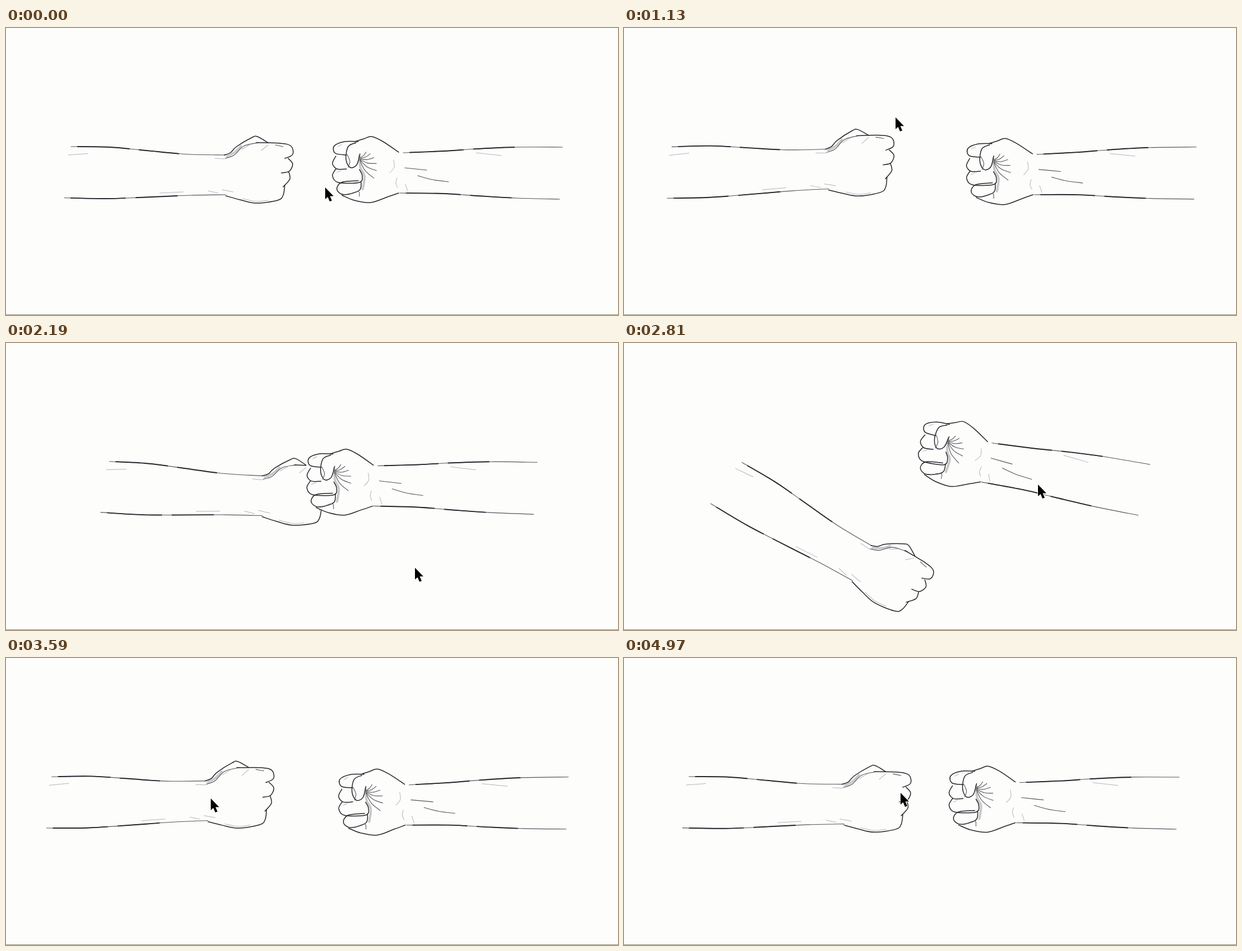
An HTML page that plays this animation: 1091 by 513 pixels, repeating every 5000 ms.

```html
<!DOCTYPE html>
<html lang="en">
<head>
<meta charset="utf-8">
<title>Fist bump</title>
<style>
html, body { margin: 0; width: 100%; height: 100%; overflow: hidden; background: #fdfdfc; }
svg { display: block; width: 100%; height: 100%; }
path { fill: none; stroke: #25252a; stroke-width: 1.5; stroke-linecap: round; stroke-linejoin: round; }
.skin { fill: #fdfdfc; stroke: none; }
.thin { stroke: #55555c; stroke-width: 1.1; }
.bold { stroke-width: 1.9; stroke-linecap: butt; stroke-dasharray: 0 4 34 6 26 30; }
.faint { stroke: #b4b4bb; stroke-width: 1; }
.shade { stroke: #77777d; stroke-width: 4; opacity: .4; }
#cursor path { fill: #000; stroke: #fff; stroke-width: 1.8; paint-order: stroke; }
</style>
</head>
<body>
<svg viewBox="0 0 1091 513" preserveAspectRatio="none">
  <g id="left"></g>
  <g id="right"></g>
  <g id="cursor"><path d="M0 0V21L4.6 17L8 25L12 23.5L8.5 15.5H15Z"/></g>
  <rect y="512" width="1091" height="1" fill="#8c8c74"/>
</svg>
<script>
const LOOP = 5000;
const [left, right, cursor] = ["left", "right", "cursor"].map(id => document.getElementById(id));

// Smooth stroke through a few points.
function curve(parent, style, points) {
  const p = points.split(" ").map(pair => pair.split(",").map(Number));
  const at = i => p[Math.max(0, Math.min(p.length - 1, i))];
  const handle = (i, sign) => at(i).map((v, k) => v + sign * (at(i + 1)[k] - at(i - 1)[k]) / 6);
  let d = "M" + p[0];
  for (let i = 1; i < p.length; i++) d += `C${handle(i - 1, 1)} ${handle(i, -1)} ${p[i]}`;
  const path = document.createElementNS("http://www.w3.org/2000/svg", "path");
  path.setAttribute("d", d);
  path.setAttribute("class", style);
  path.setAttribute("pathLength", 100);
  parent.append(path);
}

function forearm(parent, points) {
  curve(parent, "thin", points);
  curve(parent, "bold", points);
}

// Back of the left fist
forearm(left, "116,212 185,213 250,219 320,225.5 391,227");
forearm(left, "104,303.5 180,305 260,302 330,299 392,298");
curve(left, "shade", "394,229 408,222 419,211");
curve(left, "ink", "389,227 400,223 411,212 438,196 448,194 467,205");
curve(left, "thin", "391,233 407,227 424,211 450,205");
curve(left, "ink", "446,205 488,206 508,211 511,226 497,233");
curve(left, "ink", "503,233 511,243 505,256 491,259");
curve(left, "ink", "504,257 506,270 494,284");
curve(left, "ink", "497,281 494,299 484,308 446,313 417,307 392,300");
curve(left, "thin", "480,209 494,212");
for (const mark of ["111,227 146,224.5", "274,295 316,293", "360,291 378,295", "385,289 405,293",
  "372,233 390,234", "420,217 434,209", "455,219 467,209", "422,305 446,310 467,308"])
  curve(left, "faint", mark);

// Palm side of the right fist
curve(right, "skin", "622,203 652,194 694,220 706,223 706,296 682,301 645,312 596,298 583,264 581,240 585,211 622,203");
forearm(right, "708,223 780,220 840,216 910,213 992,213");
forearm(right, "702,295 780,296 840,300 910,304 987,306");
curve(right, "shade", "630,229 632,250 639,265 636,288");
curve(right, "ink", "622,203 638,198 652,194 672,203 700,222");
curve(right, "ink", "599,299 621,308 650,312 680,302 700,295");
curve(right, "ink", "628,203 604,203 585,211 587,224 607,227");
curve(right, "ink", "588,229 582,242 590,252 607,252");
curve(right, "ink", "588,252 582,264 592,276 630,276 635,264 630,253");
curve(right, "ink", "628,273 598,276 590,289 603,298 630,290 633,274");
curve(right, "ink", "624,205 610,212 606,234 613,249 625,245 631,225");
curve(right, "thin", "608,226 613,238 610,249");
curve(right, "thin", "610,298 628,292 630,301");
curve(right, "thin", "711,250 750,254");
curve(right, "thin", "734,264 760,271 789,275");
for (const mark of ["838,223 883,228", "691,236 692,249 684,259", "697,268 695,277 698,285",
  "712,279 716,291", "592,212 599,208", "590,258 597,255"])
  curve(right, "faint", mark);

// Creases fan out from under the thumb.
for (let k = 0; k < 6; k++) {
  const angle = -.75 + k * .33, reach = 15 + 5 * k;
  const point = (r, bend) => `${631 + r * Math.cos(angle + bend)},${232 + k + r * Math.sin(angle + bend)}`;
  curve(right, "thin", `${point(0, 0)} ${point(reach / 2, .2)} ${point(reach, 0)}`);
}

// Each key: time, x, then angle or y.
const leftKeys = [
  [0, 113, 0], [300, 135, 1], [550, 165, .6], [630, 162, .4], [1075, 82, -1.5],
  [1300, 105, -7], [1590, 158, -20.2], [1780, 168, -25], [2130, 178, -3], [2600, 188, 38],
  [2810, 185, 29.7], [3220, 137, 7], [3420, 96, -4], [3590, 80, -1.6], [3700, 79, -.6],
  [4000, 122, 0], [4340, 179, -1.4], [4740, 103, .5], [4970, 113, -.3]
];
const rightKeys = [
  [0, 989, 0], [300, 973, 0], [580, 954, 0], [630, 955.5, 0], [1075, 1019, -.4],
  [1590, 968, -6.7], [1780, 961, -8.3], [2130, 946, -1], [2600, 928, 12.8], [2810, 926.5, 9.8],
  [3220, 954, 2.3], [3590, 1000, -.8], [3710, 1014, -.2], [4340, 967.5, .4], [4740, 989, 0], [4970, 986.5, .1]
];
const cursorKeys = [
  [0, 569, 285], [300, 690, 262], [630, 419, 243], [850, 340, 245], [1300, 590, 90],
  [1590, 682, 7], [2400, 735, 480], [2810, 738, 253], [3590, 365, 251], [4000, 680, 260], [4340, 493, 241]
];

function slope(keys, i, column) {
  if (!i || i === keys.length - 1) return 0;
  const rate = j => (keys[j + 1][column] - keys[j][column]) / (keys[j + 1][0] - keys[j][0]);
  const a = rate(i - 1), b = rate(i);
  return a * b <= 0 ? 0 : 2 * a * b / (a + b);
}

// Monotone cubic interpolation; the last key is held.
function sample(keys, time) {
  const next = keys.findIndex(key => key[0] > time);
  if (next < 0) return keys[keys.length - 1].slice(1);
  const from = keys[next - 1], to = keys[next];
  const span = to[0] - from[0], u = (time - from[0]) / span, ease = u * u * (3 - 2 * u);
  return [1, 2].map(c => from[c] + (to[c] - from[c]) * ease
    + span * u * (1 - u) * ((1 - u) * slope(keys, next - 1, c) - u * slope(keys, next, c)));
}

function place(arm, x, y, angle, pivot) {
  arm.setAttribute("transform", `translate(${x} ${y}) rotate(${angle}) translate(${pivot})`);
}

function draw() {
  const time = performance.now() % LOOP;
  const [lx, la] = sample(leftKeys, time);
  const [rx, ra] = sample(rightKeys, time);
  place(left, lx, 258 - .2 * la, la, "-113 -258");
  place(right, rx, 259.5 + .3 * ra, ra, "-989 -259.5");
  cursor.setAttribute("transform", `translate(${sample(cursorKeys, time).join(" ")})`);
  requestAnimationFrame(draw);
}
draw();
</script>
</body>
</html>
```
